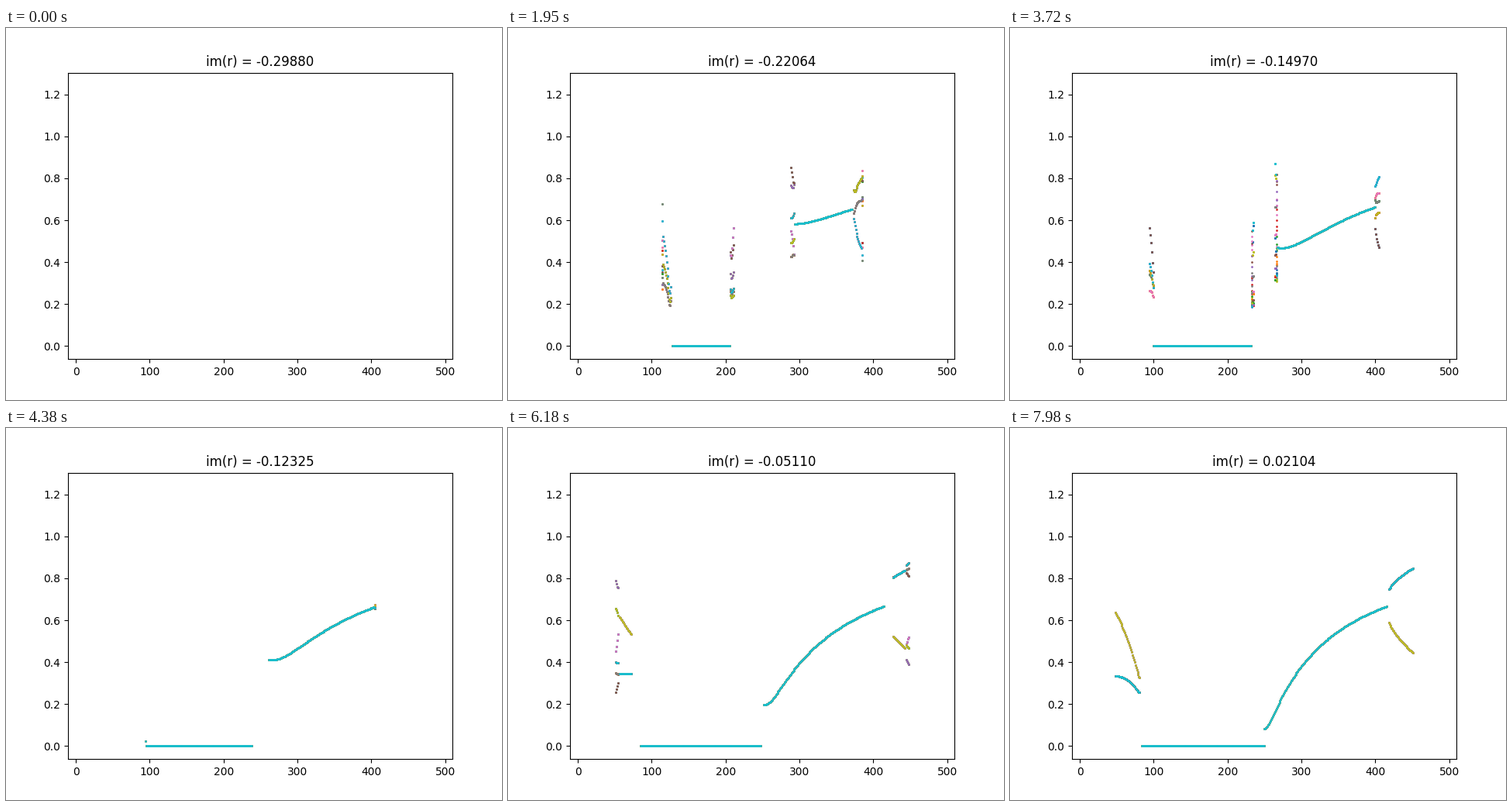
Recreate the animation shown at these times as a matplotlib script. Size 640 by 480 pixels, loop 8 s.

```python
import numpy as np
import matplotlib.pyplot as plt
from matplotlib.animation import FuncAnimation

SIZE = 500        # grid points along each axis of r
FRAMES = 267
LOOP_MS = 8000
STEPS = 10000     # length of each orbit, start value included
SHOWN = 40        # last orbit values drawn per column

re = np.linspace(-0.5, 1, SIZE)
im = np.linspace(-0.3, 0.3, SIZE)[1:FRAMES + 1]


def orbit_tails(r):
    """Last SHOWN values of |z| for z -> r z (1 - z) from z = 0.5, NaN if escaped."""
    tail = np.full((SHOWN, r.size), np.nan)

    # Orbits with a strongly attracting fixed point are known in closed form.
    to_zero = np.abs(r) < 0.99
    to_point = np.abs(2 - r) < 0.99
    tail[:, to_zero] = 0
    tail[:, to_point] = np.abs(1 - 1 / r[to_point])

    live = np.flatnonzero(~(to_zero | to_point))
    c = r[live]
    z = np.full(live.size, 0.5 + 0j)
    first = STEPS - SHOWN
    with np.errstate(all="ignore"):
        for n in range(1, STEPS):
            z = c * z * (1 - z)
            if n >= first:
                size = np.abs(z)
                tail[n - first, live] = np.where(size < 4, size, np.nan)
            elif n % 20 == 0:
                keep = np.abs(z) < 4
                if not keep.all():
                    live, c, z = live[keep], c[keep], z[keep]
    return tail


def padded(low, high, margin=0.05):
    pad = margin * (high - low)
    return low - pad, high + pad


grid = 4 * (re + 1j * im[:, None])
tails = orbit_tails(grid.ravel()).reshape(SHOWN, FRAMES, SIZE)

fig, ax = plt.subplots(figsize=(6.4, 4.8), dpi=100)
ax.set_xlim(*padded(13, 486))
ax.set_ylim(*padded(0, 1.2414))
title = ax.set_title("")
columns = np.arange(SIZE)
dots = [ax.plot([], [], "o", markersize=1, color=f"C{k % 10}")[0]
        for k in range(SHOWN)]


def draw(frame):
    title.set_text(f"im(r) = {im[frame]:.5f}")
    seen = np.isfinite(tails[:, frame])
    for k, dot in enumerate(dots):
        dot.set_data(columns[seen[k]], tails[k, frame, seen[k]])
    return [title, *dots]


anim = FuncAnimation(fig, draw, frames=FRAMES, interval=LOOP_MS / FRAMES,
                     repeat=True, repeat_delay=0, blit=False,
                     cache_frame_data=False)
plt.show()
```
